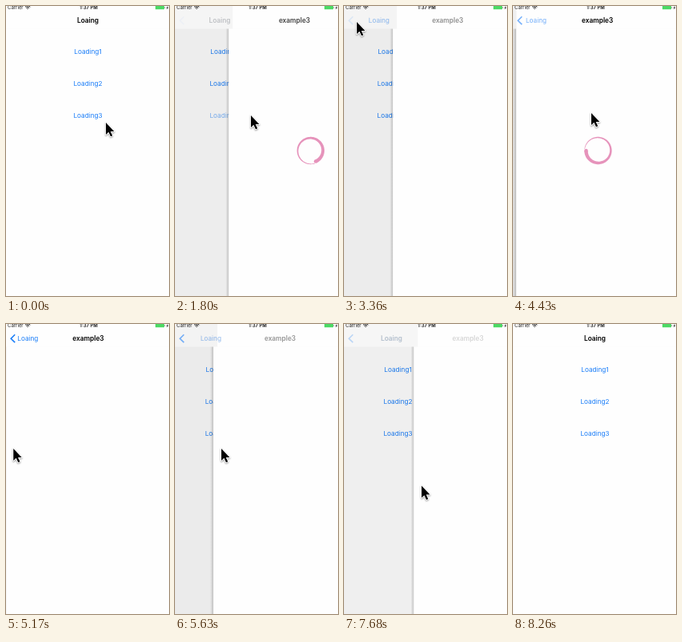
An HTML page with a canvas for the animation above (9310 ms loop, 204 by 363 pixels).

```html
<!DOCTYPE html>
<html lang="en">
<head>
<meta charset="utf-8">
<title>Loading demo</title>
<style>
  html, body { margin: 0; width: 100%; height: 100%; overflow: hidden; background: #fefefe; }
  canvas { display: block; width: 204px; height: 363px; }
</style>
</head>
<body>
<canvas id="stage"></canvas>
<script>
const W = 204, H = 363, LOOP = 9310, NAV_BOTTOM = 28.5;
const PAPER = '#fefefe', BLUE = '#1a7df8', PINK = '#e693bb';
const FONT = 'Inter, Roboto, sans-serif';
const canvas = document.getElementById('stage');
const ctx = canvas.getContext('2d');
const dpr = window.devicePixelRatio || 1;
canvas.width = W * dpr;
canvas.height = H * dpr;

const PUSHES = [1673, 4105];
const POP = 3300;
const DRAG_START = 5150;
const SPINS = [[1673, 3300], [4105, 5150], [6377, 7300]];
const TAPS = [[1440, 1680], [3960, 4110]];

// Edge of the page while it is dragged: time, x
const DRAG = [[5150, 0], [5630, 48], [6050, 48], [6100, 42], [6270, 42], [6385, 0],
  [7300, 0], [7910, 128], [8085, 128], [8260, 204]];

// Pointer tip: time, x, y
const POINTER = [[40, 125, 146], [380, 110, 78], [780, 95, 137], [2450, 95, 137],
  [3200, 16, 20], [3440, 16, 20], [3930, 98, 134], [4500, 98, 134], [5100, 8, 156],
  [5150, 9, 156], [5630, 58, 156], [6050, 58, 156], [6100, 52, 157], [6385, 52, 157],
  [6800, 65, 186], [6920, 65, 186], [7240, 8, 191], [7300, 9, 191], [7910, 138, 208],
  [8085, 138, 208], [8260, 214, 225]];

const clamp = v => Math.max(0, Math.min(1, v));

function track(keys, t, column = 1) {
  const i = keys.findIndex(key => key[0] > t);
  if (i === 0) return keys[0][column];
  if (i < 0) return keys[keys.length - 1][column];
  const a = keys[i - 1], b = keys[i];
  const s = (t - a[0]) / (b[0] - a[0]);
  return a[column] + (b[column] - a[column]) * s * s * (3 - 2 * s);
}

// Share of the way still left in a critically damped spring
function springLeft(ms) {
  const u = Math.max(0, ms) * 0.018;
  return u > 9 ? 0 : (1 + u) * Math.exp(-u);
}

// page and bar: 0 = detail page shown, 1 = list shown
function transition(t) {
  const lag = 12;
  if (t >= DRAG_START) {
    const p = track(DRAG, t) / W;
    return { page: p, bar: p, kind: 'drag' };
  }
  if (t >= POP && t < PUSHES[1]) {
    return { page: 1 - springLeft(t - POP), bar: 1 - springLeft(t - POP - lag), kind: 'pop' };
  }
  const start = t < POP ? PUSHES[0] : PUSHES[1];
  return { page: springLeft(t - start), bar: springLeft(t - start - lag), kind: 'push', age: t - start };
}

function label(text, x, y, color, alpha = 1, size = 8.2, weight = 400, align = 'center') {
  if (alpha <= 0) return;
  ctx.globalAlpha = clamp(alpha);
  ctx.font = `${weight} ${size}px ${FONT}`;
  ctx.textAlign = align;
  ctx.fillStyle = color;
  ctx.fillText(text, x, y);
  ctx.globalAlpha = 1;
}

function rect(x, y, w, h, color) {
  ctx.fillStyle = color;
  ctx.fillRect(x, y, w, h);
}

function drawList(t, p) {
  const x = 102.5 - 0.3 * W * (1 - p);
  let pressed = 1;
  for (const [down, up] of TAPS) {
    if (t >= down) pressed = 0.2 + 0.8 * clamp((t - up) / 260);
  }
  for (let i = 1; i <= 3; i++) {
    label('Loading' + i, x, 20 + 40 * i - 0.4, BLUE, i === 3 ? pressed : 1);
  }
}

function drawSpinner(cx, cy, head) {
  const steps = 90, outer = 17.2, sweep = Math.PI * 1.96;
  const point = (r, a) => ctx.lineTo(cx + r * Math.cos(a), cy + r * Math.sin(a));
  ctx.fillStyle = PINK;
  ctx.beginPath();
  for (let i = 0; i <= steps; i++) point(outer, head - sweep * i / steps);
  for (let i = steps; i >= 0; i--) {
    point(outer - 0.6 - 3.9 * (1 - i / steps), head - sweep * i / steps);
  }
  ctx.fill();
  const mid = outer - 2.25;
  ctx.beginPath();
  ctx.arc(cx + mid * Math.cos(head), cy + mid * Math.sin(head), 2.25, 0, 7);
  ctx.fill();
}

function drawPage(t, p) {
  const edge = p * W;
  if (p > 0.999) return;
  rect(0, 0, W, H, `rgba(0,0,0,${0.1 * (1 - p)})`);
  if (edge > 0.3) {
    const shadow = ctx.createLinearGradient(edge - 4, 0, edge, 0);
    shadow.addColorStop(0, 'rgba(0,0,0,0)');
    shadow.addColorStop(1, 'rgba(0,0,0,.18)');
    rect(edge - 4, 0, 4, H, shadow);
  }
  rect(edge, 0, W - edge, H, PAPER);
  const spin = SPINS.find(([from, to]) => t >= from && t < to);
  if (spin) drawSpinner(edge + 102.5, 181, ((t - spin[0]) * 0.58 - 9) * Math.PI / 180);
}

function drawBar({ page, bar, kind, age }) {
  rect(0, 0, W, NAV_BOTTOM, PAPER);
  if (page > 0.004 && page < 0.999) {
    const gray = 0.055 * (1 - page);
    rect(0, 0, page * W + 5 * Math.min(1, page * 5), NAV_BOTTOM, `rgba(0,0,0,${gray})`);
  }
  let title, back, chevron, home;
  if (kind === 'push') {
    title = (1 - bar) * 1.2;
    home = 1 - 1.3 * (1 - bar);
    back = chevron = (age - 115) / 350;
  } else {
    title = back = (1 - bar) ** 3.3;
    chevron = 1 - bar * (kind === 'pop' ? 4 : 1.7);
    home = bar ** 2;
  }
  const homeX = 27.2 + 75.3 * bar;
  label('example3', 102.8 + 122 * bar, 21, '#000', title, 8.3, 600);
  label('Loaing', homeX, 21, '#000', home, 8.3, 600);
  label('Loaing', homeX, 21, BLUE, back);
  if (chevron > 0) {
    ctx.globalAlpha = clamp(chevron);
    ctx.strokeStyle = BLUE;
    ctx.lineWidth = 1.6;
    ctx.lineJoin = 'miter';
    ctx.beginPath();
    ctx.moveTo(11.2, 13.3);
    ctx.lineTo(6.2, 18.2);
    ctx.lineTo(11.2, 23.1);
    ctx.stroke();
    ctx.globalAlpha = 1;
  }
}

function drawStatus() {
  label('Carrier', 2, 4.4, '#222', 1, 6, 400, 'left');
  label('1:37 PM', 103.5, 4.4, '#111', 1, 6, 600);
  ctx.strokeStyle = '#222';
  ctx.lineWidth = 1;
  for (const r of [1, 2.7, 4.4]) {
    ctx.beginPath();
    ctx.arc(27.2, 4.2, r, -Math.PI * 0.76, -Math.PI * 0.24);
    ctx.stroke();
  }
  rect(187, 0, 11, 4.2, '#4cd964');
  rect(198.4, 1, 0.8, 2, '#888');
  ctx.fillStyle = '#222';
  ctx.fill(new Path2D('M202.6 0 L200.6 2.4 H201.8 L201.2 4.4 L203.4 1.8 H202.2 Z'));
}

const arrow = new Path2D('M0 0 V15 L3.4 11.8 L6 17.3 L8.2 16.3 L5.7 11 H10.4 Z');

function drawPointer(x, y) {
  if (x > W + 2) return;
  ctx.save();
  ctx.translate(x, y);
  ctx.lineJoin = 'round';
  ctx.shadowColor = 'rgba(0,0,0,.4)';
  ctx.shadowBlur = 2 * dpr;
  ctx.shadowOffsetY = dpr;
  ctx.strokeStyle = '#fff';
  ctx.lineWidth = 1.8;
  ctx.stroke(arrow);
  ctx.shadowColor = 'transparent';
  ctx.fillStyle = '#000';
  ctx.fill(arrow);
  ctx.restore();
}

function draw(now) {
  const t = now % LOOP;
  const state = transition(t);
  ctx.setTransform(dpr, 0, 0, dpr, 0, 0);
  rect(0, 0, W, H, PAPER);
  drawList(t, state.page);
  drawPage(t, state.page);
  drawBar(state);
  drawStatus();
  drawPointer(track(POINTER, t, 1), track(POINTER, t, 2));
  requestAnimationFrame(draw);
}
draw(0);
</script>
</body>
</html>
```
